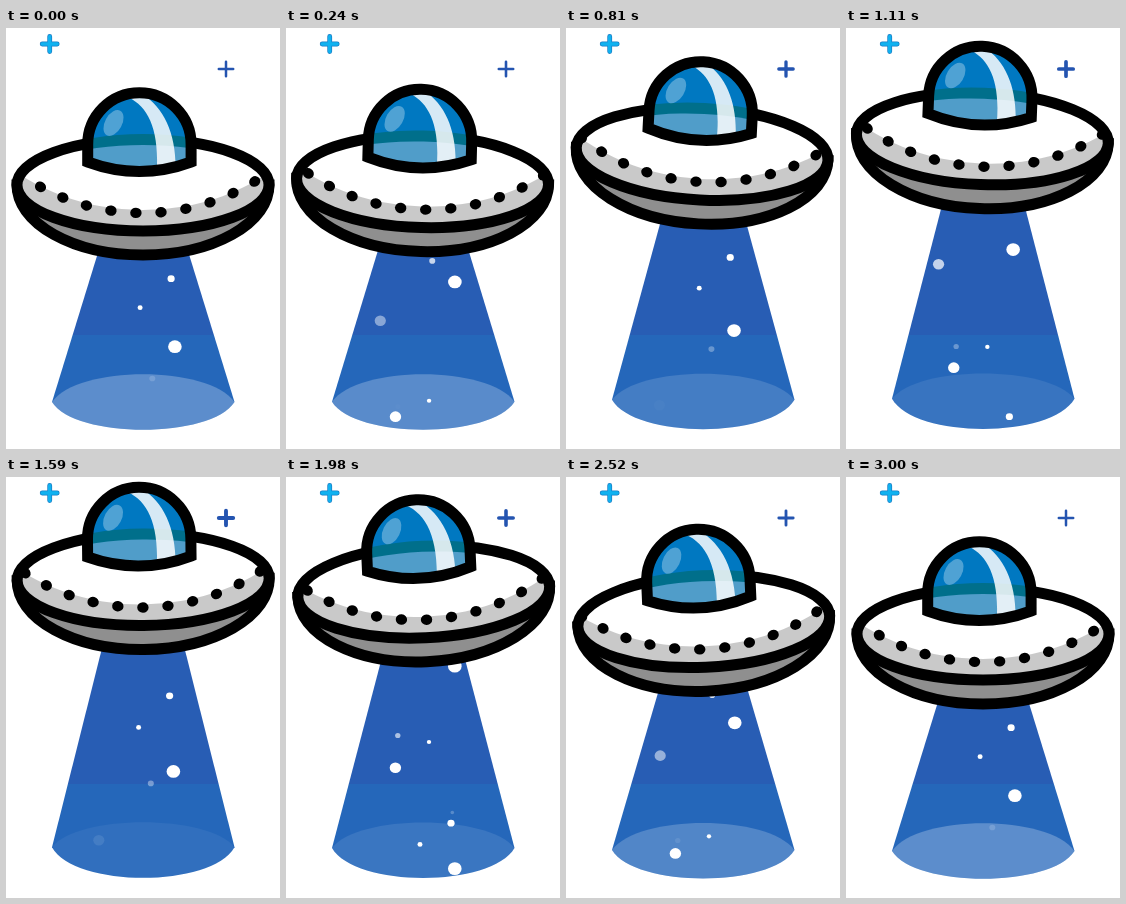
An HTML page with a canvas that plays this animation: 274 px wide and 421 px high, repeating every 3.03 s.

```html
<!DOCTYPE html>
<html lang="en">
<head>
<meta charset="utf-8">
<title>Flying saucer</title>
<style>
html, body { margin: 0; width: 100%; height: 100%; overflow: hidden; background: #fff; }
canvas { display: block; width: 274px; height: 421px; }
</style>
</head>
<body>
<canvas id="stage"></canvas>
<script>
const W = 274, H = 421, LOOP = 3030, CYCLE = 3000, RISE = 750, TAU = Math.PI * 2;
const canvas = document.getElementById('stage');
const ctx = canvas.getContext('2d');
const dpr = window.devicePixelRatio || 1;
canvas.width = W * dpr;
canvas.height = H * dpr;

// x, radius, y at the start of a rise, speed in px/ms, fades in while rising
const bubbles = [
  [168, 6.8, 319, 0.27, false],
  [164.2, 3.6, 251, 0.354, false],
  [133.2, 2.5, 280, 0.325, false],
  [108.6, 5.7, 487, 0.408, false],
  [142.2, 2.2, 481, 0.449, false],
  [111, 2.7, 499, 0.5, true],
  [93.4, 5.6, 406, 0.47, true],
  [145.4, 3, 351, 0.49, true],
  [165.5, 1.8, 552, 0.45, true]
];

function oval(x, y, rx, ry, fill, tilt = 0) {
  ctx.beginPath();
  ctx.ellipse(x, y, rx, ry, tilt, 0, TAU);
  ctx.fillStyle = fill;
  ctx.fill();
}

function outline(width) {
  ctx.lineWidth = width;
  ctx.strokeStyle = '#000';
  ctx.stroke();
}

function plus(x, y, size, width, color) {
  ctx.beginPath();
  ctx.moveTo(x - size, y);
  ctx.lineTo(x + size, y);
  ctx.moveTo(x, y - size);
  ctx.lineTo(x, y + size);
  ctx.lineWidth = width;
  ctx.lineCap = 'round';
  ctx.strokeStyle = color;
  ctx.stroke();
}

function drawBeam(t, lift, swing) {
  const corner = 374 - 0.07 * lift;
  ctx.save();
  ctx.beginPath();
  ctx.moveTo(115, 150 - lift);
  ctx.lineTo(159.5, 150 - lift);
  ctx.lineTo(228.5, corner);
  ctx.bezierCurveTo(205, 411, 69, 411, 46, corner);
  ctx.closePath();
  ctx.clip();
  ctx.fillStyle = '#285db4';
  ctx.fillRect(0, 0, W, 307);
  ctx.fillStyle = '#2567ba';
  ctx.fillRect(0, 307, W, H);

  // pool of light
  ctx.beginPath();
  ctx.moveTo(46, corner);
  ctx.bezierCurveTo(72, 337, 202, 337, 228.5, corner);
  ctx.lineTo(228.5, H);
  ctx.lineTo(46, H);
  ctx.fillStyle = `rgba(255,255,255,${0.152 + 0.098 * swing})`;
  ctx.fill();

  const phase = t % RISE;
  const sway = 0.9 * Math.cos(phase / 250 * TAU);
  for (const [x, r, y0, speed, fades] of bubbles) {
    for (let k = -1; k < 2; k++) {
      const y = y0 - speed * (phase + k * RISE);
      ctx.globalAlpha = fades ? Math.max(0, Math.min(1, (382 - y) / 200)) : 1;
      oval(x + sway, y, r, r * 0.94, '#fff');
    }
  }
  ctx.restore();
}

function drawHull(t) {
  // belly
  ctx.beginPath();
  ctx.ellipse(137, 157, 126, 70, 0, 0, Math.PI);
  ctx.closePath();
  ctx.fillStyle = '#8f8f8f';
  ctx.fill();
  outline(11);

  // disc with shaded rim and running lights
  ctx.save();
  ctx.beginPath();
  ctx.ellipse(137, 157, 126, 46, 0, 0, TAU);
  ctx.clip();
  ctx.fillStyle = '#c9c9c9';
  ctx.fillRect(0, 90, W, 130);
  oval(137, 0, 208, 182, '#fff');
  const step = TAU / 50;
  const turn = (0.28 + 7.055 * t / CYCLE) * step;
  for (let i = -6; i < 16; i++) {
    const a = i * step - turn;
    oval(137 + 200 * Math.sin(a), 185 * Math.cos(a), 5.7, 5.2, '#000', -a);
  }
  ctx.restore();
  ctx.beginPath();
  ctx.ellipse(137, 157, 126, 46, 0, 0, TAU);
  outline(11);
}

function domePath() {
  ctx.beginPath();
  ctx.moveTo(81.7, 134);
  ctx.lineTo(81.7, 116.5);
  ctx.arc(133.4, 116.5, 51.7, Math.PI, 0);
  ctx.lineTo(185.1, 134);
  ctx.quadraticCurveTo(133.4, 153, 81.7, 134);
  ctx.closePath();
}

function drawDome() {
  ctx.save();
  domePath();
  ctx.clip();
  ctx.fillStyle = '#0078c1';
  ctx.fillRect(70, 55, 130, 100);
  // the disc seen through the glass
  oval(137, 157, 131, 51, '#006f8b');
  oval(137, 157, 121, 40, '#509dc9');
  // reflections
  ctx.beginPath();
  ctx.moveTo(119, 68);
  ctx.bezierCurveTo(141, 76, 154, 100, 150.5, 146);
  ctx.lineTo(169.5, 146);
  ctx.bezierCurveTo(171, 108, 159, 80, 136, 66);
  ctx.closePath();
  ctx.fillStyle = 'rgba(255,255,255,0.84)';
  ctx.fill();
  oval(107.5, 95, 8.5, 14, 'rgba(255,255,255,0.31)', 0.5);
  ctx.restore();
  domePath();
  ctx.lineJoin = 'miter';
  outline(11);
}

function draw(t) {
  const angle = t / CYCLE * TAU;
  const swing = Math.cos(angle);
  const lift = 27.5 * (1 - swing);

  ctx.setTransform(dpr, 0, 0, dpr, 0, 0);
  ctx.fillStyle = '#fff';
  ctx.fillRect(0, 0, W, H);

  plus(43.7, 16, 7.5, 4.8, '#1a7cc4');
  plus(43.7, 16, 7.5, 3.4, '#10b2f0');
  plus(220, 41, 7.2, 3.2 - 0.7 * swing, '#2454b0');

  drawBeam(t, lift, swing);

  ctx.save();
  ctx.translate(137, 140 - lift);
  ctx.rotate(Math.sin(angle) * 3 * Math.PI / 180);
  ctx.translate(-137, -140);
  drawHull(t);
  drawDome();
  ctx.restore();
}

const start = performance.now();
function tick() {
  draw((performance.now() - start) % LOOP);
  requestAnimationFrame(tick);
}
tick();
</script>
</body>
</html>
```
